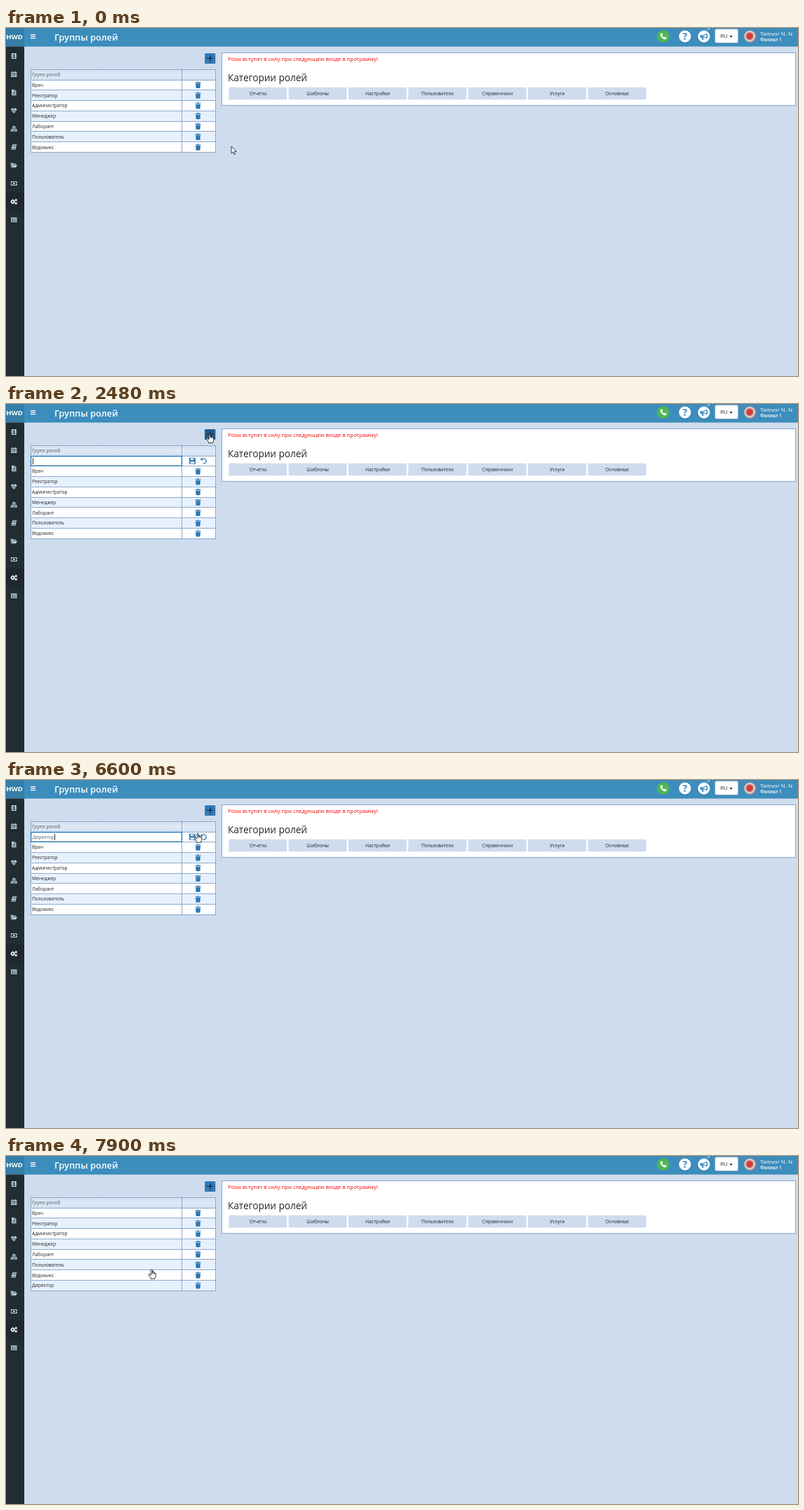
Write an HTML page that moves like this. It is 1128 px wide and 497 px high and loops after 8000 ms.

```html
<!DOCTYPE html>
<html lang="ru">
<head>
<meta charset="utf-8">
<title>Группы ролей</title>
<style>
  html, body { margin: 0; width: 100%; height: 100%; overflow: hidden; background: #cfdced; }
  svg { display: block; width: 1128px; height: 497px; }
  text { font-family: 'Open Sans', 'Noto Sans', sans-serif; font-size: 6.65px; fill: #212529; white-space: pre; }
  .white { fill: #fff; }
  .mid { text-anchor: middle; }
  .box { stroke: #8aaad0; shape-rendering: crispEdges; }
  .crisp { shape-rendering: crispEdges; }
  .blue { fill: #2f78b3; }
  .side { fill: #b8c7ce; }
  .side.on { fill: #fff; }
  .line { fill: none; stroke: #fff; }
  .hole { fill: #222d32; }
</style>
</head>
<body>
<svg id="stage" viewBox="0 0 1128 497" xmlns="http://www.w3.org/2000/svg">
  <defs>
    <linearGradient id="head" x2="0" y2="1">
      <stop offset="0" stop-color="#d3e0f0"/><stop offset=".5" stop-color="#e0eaf6"/><stop offset="1" stop-color="#d4e1f1"/>
    </linearGradient>
    <radialGradient id="photo" cx=".45" cy=".48" r=".6">
      <stop offset="0" stop-color="#d9363a"/><stop offset=".38" stop-color="#c8484a"/>
      <stop offset=".6" stop-color="#e6d9d6"/><stop offset="1" stop-color="#5a5455"/>
    </radialGradient>

    <g id="trash">
      <path d="M-4-3.7H-1.5L-1-4.6H1L1.5-3.7H4V-2.6H-4ZM-3.4-2H3.4L3 3.9Q2.9 4.6 2.2 4.6H-2.2Q-2.9 4.6-3 3.9Z"/>
    </g>
    <g id="save">
      <path d="M-4.5-4.5H3.2L4.5-3.2V4.5H-4.5Z"/>
      <path class="white" d="M-2.6-3.7H2.3V-1.1H-2.6ZM-2.8 1H2.8V3.7H-2.8Z"/>
      <path d="M.7-3.7H1.7V-1.6H.7Z"/>
    </g>
    <g id="undo">
      <path d="M-2.6-2.5A3.6 3.6 0 1 1-1.4 3.6" fill="none" stroke="#2f78b3" stroke-width="1.2"/>
      <path d="M-4.4-4.4V-.6H-.6Z"/>
    </g>

    <g id="arrow">
      <path d="M0 0V10.2L2.3 8.1 4 11.6 5.7 10.8 4.1 7.4H7.2Z" fill="#fff" stroke="#000" stroke-width=".75"/>
    </g>
    <g id="hand">
      <path d="M-1 .8Q0-.5 1 .8V4.6Q2-.0 2 4.2Q3.2 3.6 3.6 4.8Q5.8 4.4 5.8 6.4V9Q5.6 11 4.5 12.2V13.3H-1.3V12.2Q-3 10-4.5 7.3Q-4.3 5.8-2.8 6.6L-1 8.3Z" fill="#fff" stroke="#000" stroke-width=".8" stroke-linejoin="round"/>
      <path d="M1 4.4V6.8M2.7 4.6V7M4.2 5.2V7.2" stroke="#000" stroke-width=".6"/>
    </g>
    <g id="beam">
      <path d="M-2-4.5H-.5L0-4 .5-4.5H2M0-4V4M-2 4.5H-.5L0 4 .5 4.5H2" fill="none" stroke="#111" stroke-width=".9"/>
    </g>

    <g id="card"><rect x="-3.5" y="-4" width="7" height="8" rx=".8"/><circle class="hole" cy="-1.2" r="1.3"/><path class="hole" d="M-2.2 2.4Q-2 .6 0 .6T2.2 2.4Z"/></g>
    <g id="calendar"><path d="M-4-3H-2.6V-4.3H-1.4V-3H1.4V-4.3H2.6V-3H4V4H-4Z"/><path class="hole" d="M-3.3-1.4H3.3V-.8H-3.3ZM-3.3.8H3.3V1.3H-3.3ZM-1.4-1.4H-.9V3.4H-1.4ZM.9-1.4H1.4V3.4H.9Z"/></g>
    <g id="file"><path d="M-3.2-4.2H.8L3.2-1.8V4.2H-3.2Z"/><path class="hole" d="M.6-4.2V-1.5H3.2V-1H0V-4.2ZM-1.9.2H1.9V.9H-1.9ZM-1.9 1.8H1.9V2.5H-1.9Z"/></g>
    <g id="heart"><path d="M0 3.9-3.7.1C-5.3-2.4-1.9-5 0-2.4 1.9-5 5.3-2.4 3.7.1Z"/><path d="M-4 .3H-1.8L-.9-1.3.4 1.7 1.3.3H4" fill="none" stroke="#222d32" stroke-width=".7"/></g>
    <g id="cube"><path d="M0-2.3 2.2-1.3V1.2L0 2.3-2.2 1.2V-1.3Z"/><path d="M-1.7-.9 0-.1 1.7-.9M0-.1V1.8" fill="none" stroke="#222d32" stroke-width=".5"/></g>
    <g id="cubes"><use href="#cube" y="-2.1"/><use href="#cube" x="-2.4" y="2"/><use href="#cube" x="2.4" y="2"/></g>
    <g id="book"><path d="M-2-3.7H4L2.2 3.7H-3.6Q-4.4 3-3.7 2Z"/><path class="hole" d="M-.8-2.2H2.4L2.3-1.6H-1ZM-1.2-.8H2L1.9-.2H-1.4ZM-3 2.3H1.7L1.6 2.9H-3.1Z"/></g>
    <g id="folder"><path d="M-4.4 2.8V-3.3H-1.4L-.5-2.3H2.8V-1.1H-2.4Z"/><path d="M-2-.5H4.8L2.9 3.3H-4Z"/></g>
    <g id="money"><path d="M-4.5-3H4.5V3H-4.5Z"/><path class="hole" d="M-3.5-1Q-2.7-1.1-2.5-2H2.5Q2.7-1.1 3.5-1V1Q2.7 1.1 2.5 2H-2.5Q-2.7 1.1-3.5 1Z"/><circle r="1.5"/></g>
    <g id="cogs">
      <g fill="none" stroke="#fff"><circle cx="-1.5" r="1.9" stroke-width="1.5"/><circle cx="-1.5" r="2.9" stroke-width=".9" stroke-dasharray="1.14"/>
      <circle cx="3" cy="-2.3" r="1.05" stroke-width="1.1"/><circle cx="3" cy="2.4" r="1.05" stroke-width="1.1"/></g>
    </g>
    <g id="list"><path d="M-4.2-3.4H4.2V3.4H-4.2Z"/><path class="hole" d="M-3.4-1.6H3.4V-1H-3.4ZM-3.4.1H3.4V.6H-3.4ZM-3.4 1.7H3.4V2.2H-3.4ZM-2-1.6H-1.6V2.8H-2Z"/></g>
  </defs>

  <rect width="1128" height="497" fill="#cfdced"/>
  <rect width="1128" height="26.5" fill="#3c8dbc"/>
  <rect width="26" height="26.5" fill="#367fa9"/>
  <rect y="26.5" width="26" height="471" fill="#222d32"/>
  <rect y="235" width="26" height="26" fill="#1e282c"/>
  <g id="menu"></g>

  <text class="white mid" x="12" y="15.6" style="font-size:9.6px;font-weight:700">HWD</text>
  <path class="line" d="M35 9.7H42M35 12.2H42M35 14.7H42" stroke-width="1.3"/>
  <text class="white" x="69" y="17.6" style="font-size:12.8px;font-weight:600">Группы ролей</text>

  <circle cx="936" cy="12" r="9" fill="#4fb654"/>
  <path class="white" d="M932.4 8Q933.6 6.9 934.3 7.6L935.6 9.6 934.6 11Q935.4 12.8 937.2 13.6L938.5 12.5 940.6 13.8Q941.2 14.6 940 15.8 938.4 17.2 935.5 15.1 932.6 13 931.9 10.3 931.6 8.9 932.4 8Z"/>
  <circle class="white" cx="967" cy="12" r="8.5"/>
  <text class="mid" x="967" y="17" style="font-size:14px;font-weight:700;fill:#3c8dbc">?</text>
  <circle class="white" cx="994" cy="12" r="8.5"/>
  <path d="M988.3 10.3H992.2Q996 9.9 998.5 7V16Q996 13.4 992.8 13.2L993.8 16.7H991.4L990.2 13.2H988.3Z" fill="#3c8dbc"/>
  <path d="M993 11.2Q995.6 10.8 997.3 9.3V13.8Q995.6 12.5 993 12.1Z" fill="#fff"/>
  <path d="M999.2 10.4V12.9" stroke="#3c8dbc" stroke-width="1.2"/>
  <text class="white mid" x="1000.5" y="3.4" style="font-size:6px">0</text>
  <rect x="1010" y="1.8" width="32.5" height="19.2" rx="2" fill="#fff" stroke="#c9d3da" stroke-width=".6"/>
  <text x="1017.5" y="14.4" style="font-size:7.7px">RU</text>
  <path d="M1030.3 11H1035L1032.65 13.6Z" fill="#222"/>
  <circle cx="1060" cy="12" r="9" fill="url(#photo)"/>
  <text class="white" x="1074" y="10.8" style="font-size:8px">Tamvor N. N.</text>
  <text class="white" x="1074" y="18.8" style="font-size:6.4px;font-weight:600">Филиал 1</text>

  <rect class="box" x="307.5" y="35.5" width="817" height="75" fill="#fff"/>
  <text x="316" y="47.3" style="font-size:7.75px;fill:#f00">Роли вступят в силу при следующем входе в программу!</text>
  <text x="316" y="75.8" style="font-size:13.55px">Категории ролей</text>
  <g id="tabs"></g>

  <g id="add">
    <rect id="addBox" x="283" y="36" width="15.3" height="15" rx="1.6"/>
    <path d="M286.3 43.4H295M290.65 39V47.8" stroke="#10293f" stroke-width="1.3"/>
  </g>

  <g id="rows"></g>
  <rect class="box" x="35.5" y="59.5" width="262.5" height="14.5" fill="url(#head)"/>
  <path class="box" d="M250.5 59.5V74"/>
  <text x="37" y="69.2" style="fill:#4d565f">Групи ролей</text>

  <g id="edit">
    <rect class="box" x="250.5" y="74" width="47.5" height="14.7" fill="#fff"/>
    <rect id="field" x="35.6" y="74.6" width="214.8" height="13.6" fill="#fff"/>
    <text id="typed" x="37.8" y="83.9" style="fill:#59646e"></text>
    <rect id="caret" class="crisp" y="77" width="1" height="9" fill="#333"/>
    <use href="#save" class="blue" x="265.5" y="81.2"/>
    <use href="#undo" class="blue" x="281.8" y="81.2"/>
  </g>
  <use id="cursor"/>
</svg>
<script>
  const LOOP = 8000, ROW = 14.8, OPEN = 1460, BLUR = 6880, SAVED = 7610;
  const $ = id => document.getElementById(id);
  const show = (el, on) => el.setAttribute('visibility', on ? 'inherit' : 'hidden');

  $('menu').innerHTML = ['card', 'calendar', 'file', 'heart', 'cubes', 'book', 'folder', 'money', 'cogs', 'list']
    .map((id, i) => `<use href="#${id}" class="side${id === 'cogs' ? ' on' : ''}" x="11.3" y="${40 + 26 * i}"/>`).join('');

  $('tabs').innerHTML = ['Отчёты', 'Шаблоны', 'Настройки', 'Пользователи', 'Справочники', 'Услуги', 'Основные']
    .map((name, i) => {
      const x = 317.3 + 85.25 * i;
      return `<rect x="${x}" y="84.7" width="82.8" height="17.6" fill="#cfdced"/>
        <text class="mid" x="${x + 41.6}" y="95.9">${name}</text>`;
    }).join('');

  $('rows').innerHTML = ['Врач', 'Реестратор', 'Администратор', 'Менеджер', 'Лаборант', 'Пользователь', 'Ведомикс', 'Директор']
    .map((name, i) => {
      const y = 73.9 + ROW * i;
      return `<g><rect class="box" x="35.5" y="${y}" width="262.5" height="${ROW}" fill="${i % 2 ? '#e7f1fd' : '#fff'}"/>
        <path class="box" d="M250.5 ${y}v${ROW}"/>
        <text x="37" y="${y + 9.8}">${name}</text>
        <use href="#trash" class="blue" x="273.5" y="${y + 7.4}"/></g>`;
    }).join('');
  const lastRow = $('rows').lastElementChild;

  // time, x, y, shape
  const path = [
    [0, 321, 169, 'arrow'], [280, 319, 160, 'arrow'], [430, 313, 130, 'arrow'], [580, 304, 92, 'arrow'],
    [730, 296, 60, 'arrow'], [880, 291, 41, 'hand'], [1030, 290, 33, 'arrow'], [1180, 290, 38, 'hand'],
    [1320, 289.5, 41.3, 'hand'], [1900, 290, 42.3, 'hand'], [5890, 291.5, 46, 'hand'],
    [6170, 289, 54, 'arrow'], [6320, 282, 66, 'arrow'], [6460, 273, 76, 'hand'], [6610, 267, 80, 'hand'],
    [6750, 265.5, 80.5, 'hand'], [7030, 249, 84, 'beam'], [7170, 229.8, 87, 'beam'],
    [7320, 222, 97, 'hand'], [7470, 214, 124, 'hand'], [7610, 210, 146, 'hand'],
    [7760, 208.5, 158, 'hand'], [7900, 207.5, 162, 'hand']
  ];
  // time, letters typed so far
  const typing = [[0, 0], [3070, 1], [3780, 2], [4080, 3], [4390, 4], [4690, 6], [5000, 7], [5150, 8]];
  // time, caret visible
  const blink = [[0, 1], [2050, 0], [2480, 1], [3650, 0], [3780, 1], [5590, 0], [6170, 1], [6750, 0]];
  const at = (steps, t) => steps.findLast(s => s[0] <= t);

  function draw() {
    const t = performance.now() % LOOP;
    const editing = t >= OPEN && t < SAVED, focused = t < BLUR;
    const [, x, y, shape] = at(path, t);

    $('cursor').setAttribute('href', '#' + shape);
    $('cursor').setAttribute('transform', `translate(${x} ${y})`);
    const hover = x > 283 && x < 298 && y > 36 && y < 51;
    $('addBox').setAttribute('fill', hover ? '#225c8e' : '#337ab7');

    $('rows').setAttribute('transform', `translate(0 ${editing ? ROW : 0})`);
    show(lastRow, t >= SAVED);
    show($('edit'), editing);
    $('field').setAttribute('stroke', focused ? '#2f80bb' : '#dfe5ec');
    $('field').setAttribute('stroke-width', focused ? 1.5 : .8);

    $('typed').textContent = 'Директор'.slice(0, at(typing, t)[1]);
    $('caret').setAttribute('x', 38 + $('typed').getComputedTextLength());
    show($('caret'), editing && at(blink, t)[1]);
    requestAnimationFrame(draw);
  }
  draw();
</script>
</body>
</html>
```
